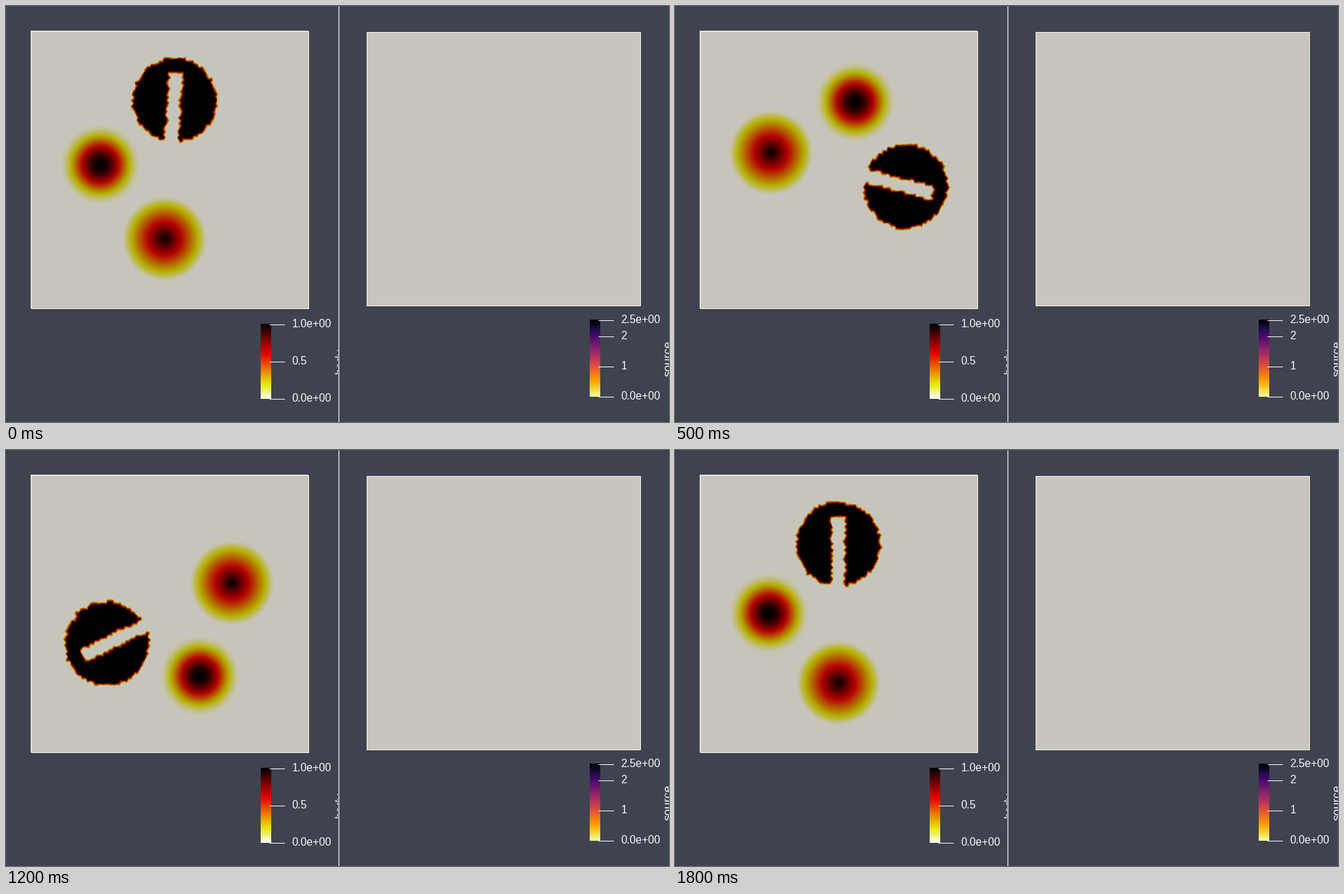
Recreate the animation shown at these times as a matplotlib script. Size 945x593 px, loop 1900 ms.

```python
import numpy as np
import matplotlib.pyplot as plt
from matplotlib.animation import FuncAnimation
from matplotlib.colors import LinearSegmentedColormap
from matplotlib.patches import Rectangle
from matplotlib.tri import Triangulation

W, H, DPI = 945, 593, 64                    # a power of two keeps the size exact
FRAMES, INTERVAL = 19, 100
SIDE = 396                                  # left square, pixels
BACK = "#3f434f"
LIGHT = np.array([0.784, 0.772, 0.737])     # shading of the lit surfaces
INK = "#f4f4f6"

STOPS = [(0, (1, 1, 1)), (0.2, (0.902, 0.902, 0)),
         (0.6, (0.902, 0, 0)), (1, (0, 0, 0))]


def black_body(name, light):
    stops = [(p, tuple(np.array(c) * light)) for p, c in STOPS]
    return LinearSegmentedColormap.from_list(name, stops, N=256)


def px(size):
    return size * 72 / DPI


def make_mesh(rows=92, jitter=0.24):
    """Irregular triangle mesh a little larger than the unit square."""
    h = 1.04 / rows
    j, i = np.mgrid[0:rows + 9, 0:rows + 3]
    x = -0.03 + h * (i + 0.5 * (j % 2))
    y = -0.03 + h * j * 0.92
    rng = np.random.default_rng(7)
    x = x + rng.uniform(-jitter, jitter, x.shape) * h
    y = y + rng.uniform(-jitter, jitter, y.shape) * h
    return Triangulation(x.ravel(), y.ravel())


def pixel_weights(mesh):
    """Corner nodes and barycentric weights for every pixel."""
    s = (np.arange(SIDE) + 0.5) / SIDE
    x, y = np.meshgrid(s, s)
    corners = mesh.triangles[mesh.get_trifinder()(x, y)]
    ax_, bx, cx = np.moveaxis(mesh.x[corners], -1, 0)
    ay, by, cy = np.moveaxis(mesh.y[corners], -1, 0)
    det = (by - cy) * (ax_ - cx) + (cx - bx) * (ay - cy)
    wa = ((by - cy) * (x - cx) + (cx - bx) * (y - cy)) / det
    wb = ((cy - ay) * (x - cx) + (ax_ - cx) * (y - cy)) / det
    return corners, np.stack([wa, wb, 1 - wa - wb], axis=-1)


def bodies(x, y):
    """Slotted disc above, smooth hump on the left, cone below."""
    r0 = 0.15
    slot = (np.abs(x) < 0.025) & (y > -0.35)
    disc = (np.hypot(x, y + 0.25) < r0) & ~slot
    hump = np.minimum(np.hypot(x + 0.25, y) / r0, 1)
    cone = np.minimum(np.hypot(x, y - 0.25) / r0, 1)
    return disc + 0.5 * (1 + np.cos(np.pi * hump)) + 1 - cone


mesh = make_mesh()
corners, weights = pixel_weights(mesh)


def field(angle):
    c, s = np.cos(angle), np.sin(angle)
    x, y = mesh.x - 0.5, mesh.y - 0.5
    nodes = bodies(c * x + s * y, c * y - s * x)
    return (nodes[corners] * weights).sum(axis=-1)


def turn(frame):
    """4 degrees per step, every fifth step shown, stopping at a full turn."""
    return np.radians(min(4 + 20 * frame, 360))


fig = plt.figure(figsize=(W / DPI, H / DPI), dpi=DPI, facecolor=BACK)
ax = fig.add_axes([0, 0, 1, 1])
ax.axis("off")


def image(data, box, cmap, z=1):
    x0, y0, x1, y1 = box
    return ax.imshow(data, extent=(x0, x1, y1, y0), cmap=cmap, vmin=0, vmax=1,
                     interpolation="nearest", aspect="auto", zorder=z)


def outline(x, y, w, h, fill="none"):
    ax.add_patch(Rectangle((x, y), w, h, fc=fill, ec="#eeeeec", lw=px(1),
                           joinstyle="round", zorder=2))


def line(xs, ys, width=1):
    ax.plot(xs, ys, color=INK, lw=px(width), solid_capstyle="butt", zorder=4)


def label(x, y, text, size, **kw):
    return ax.text(x, y, text, color=INK, fontsize=px(size),
                   family="Liberation Sans", zorder=5, **kw)


def color_bar(box, cmap, ticks):
    x0, y0, x1, y1 = box
    image(np.linspace(1, 0, 256)[:, None], box, cmap, z=3)
    for y, text in ticks:
        line([x1 - 3, x1 + 18.5], [y, y])
        label(x1 + 29.5, y + 4.3, text, 15.5)


def title(x, y, text, right):
    t = label(x, y, text, 17, rotation=90, rotation_mode="anchor",
              ha="center", va="baseline", clip_on=True)
    t.set_clip_path(Rectangle((0, 0), right, H, transform=ax.transData))


surface = image(field(turn(0)), (35, 35, 431, 431), black_body("lit", LIGHT))
outline(35.5, 35.5, 395, 395)
outline(513.5, 37, 390, 390, fill=tuple(LIGHT))

color_bar((363, 453, 378, 560), black_body("plain", 1),
          [(453.5, "1.0e+00"), (506.5, "0.5"), (559.5, "0.0e+00")])
color_bar((832, 447, 847, 557), "inferno_r",
          [(447.5, "2.5e+00"), (470.5, "2"), (513.5, "1"), (556.5, "0.0e+00")])
line([473.5, 473.5], [0, H], 1.2)

ax.set_xlim(0, W)
ax.set_ylim(H, 0)
title(480.5, 506, "body", 473)
title(948, 502, "source", W)


def update(frame):
    surface.set_data(field(turn(frame)))
    return [surface]


anim = FuncAnimation(fig, update, frames=FRAMES, interval=INTERVAL,
                     repeat=True, repeat_delay=0, blit=False)
plt.show()
```
